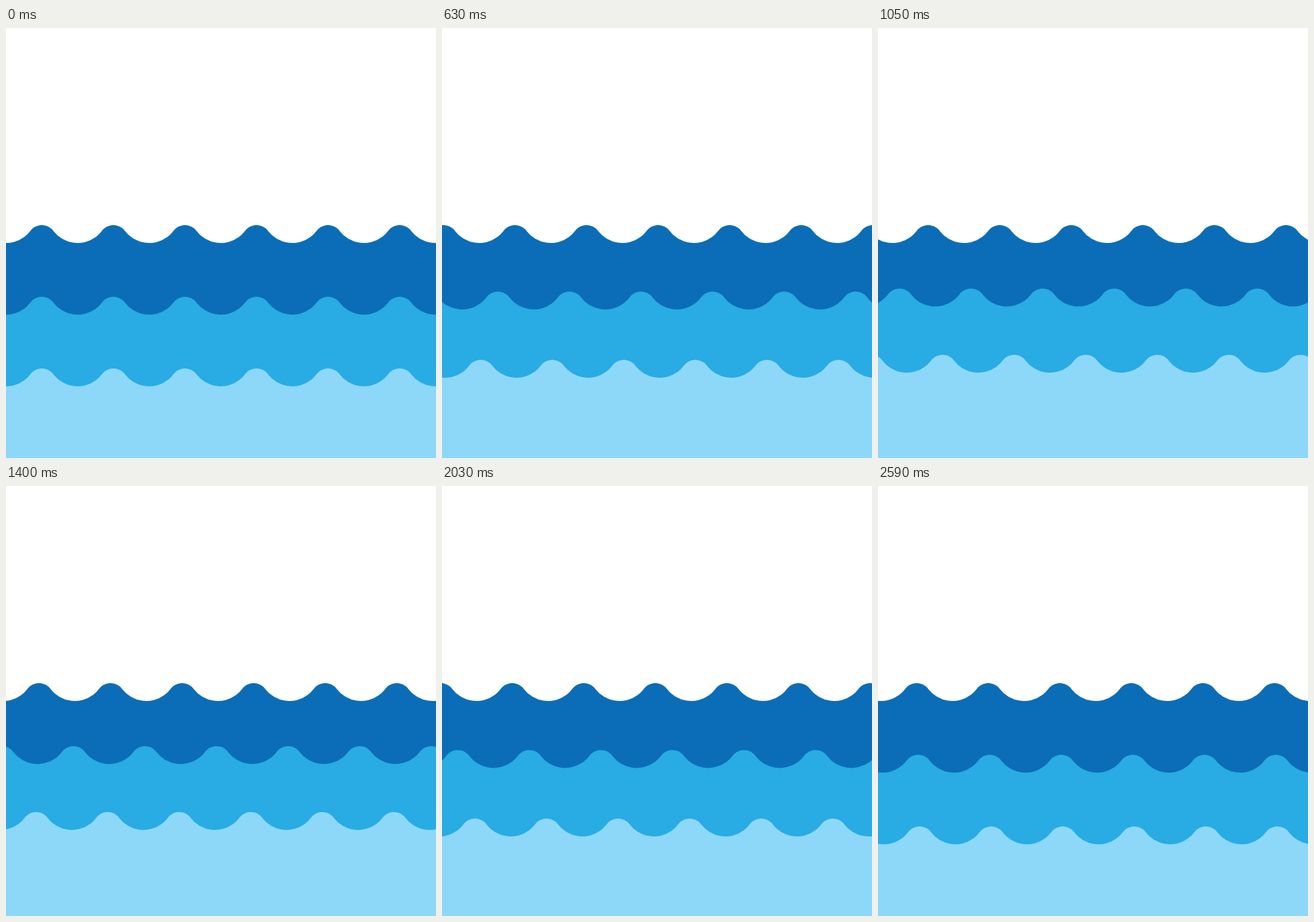
An HTML page with a canvas that plays this animation: 600x600 px, repeating every 2.62 s.

```html
<!DOCTYPE html>
<html lang="en">
<head>
<meta charset="utf-8">
<title>Waves</title>
<style>
  html, body { margin: 0; height: 100%; overflow: hidden; background: #fff; }
  canvas { display: block; }
</style>
</head>
<body>
<canvas id="sea" width="600" height="600"></canvas>
<script>
const ctx = document.getElementById('sea').getContext('2d');
const LOOP = 2620, HOLD = 70, TICKS = 50;
const PERIOD = 99.85, HEIGHT = 25;
const CREST_R = 20, TROUGH_R = 42.5;
const BEND = 2 * Math.atan(0.5); // arcs of crest and trough meet at this slope

const layers = [
  { color: '#0b6db7', top: 275, speed: 4, lift: 0 },
  { color: '#29abe4', top: 375, speed: 6, lift: 0.6 },
  { color: '#8dd8f8', top: 475, speed: 8, lift: 1 },
];

// Steady rise and fall with a rounded turn at the top
function swell(tick) {
  const v = Math.max(0, Math.min(tick, 49 - tick));
  return v < 16 ? v : v - (v - 16) ** 2 / 17;
}

function drawWave({ color, top, speed, lift }, tick) {
  const y = top - lift * swell(tick);
  const first = (50 + (100 - speed) * tick) % 100 - 2 * PERIOD;
  const up = -Math.PI / 2, down = Math.PI / 2;
  ctx.beginPath();
  for (let i = 0; i < 10; i++) {
    const x = first + i * PERIOD;
    ctx.arc(x, y + CREST_R, CREST_R, up - BEND, up + BEND);
    ctx.arc(x + PERIOD / 2, y + HEIGHT - TROUGH_R, TROUGH_R, down + BEND, down - BEND, true);
  }
  ctx.lineTo(900, 600);
  ctx.lineTo(-300, 600);
  ctx.fillStyle = color;
  ctx.fill();
}

function draw() {
  const time = Math.floor(performance.now() % LOOP / HOLD) * HOLD;
  const tick = Math.floor(time * TICKS / LOOP);
  ctx.clearRect(0, 0, 600, 600);
  for (const layer of layers) drawWave(layer, tick);
  requestAnimationFrame(draw);
}
draw();
</script>
</body>
</html>
```
